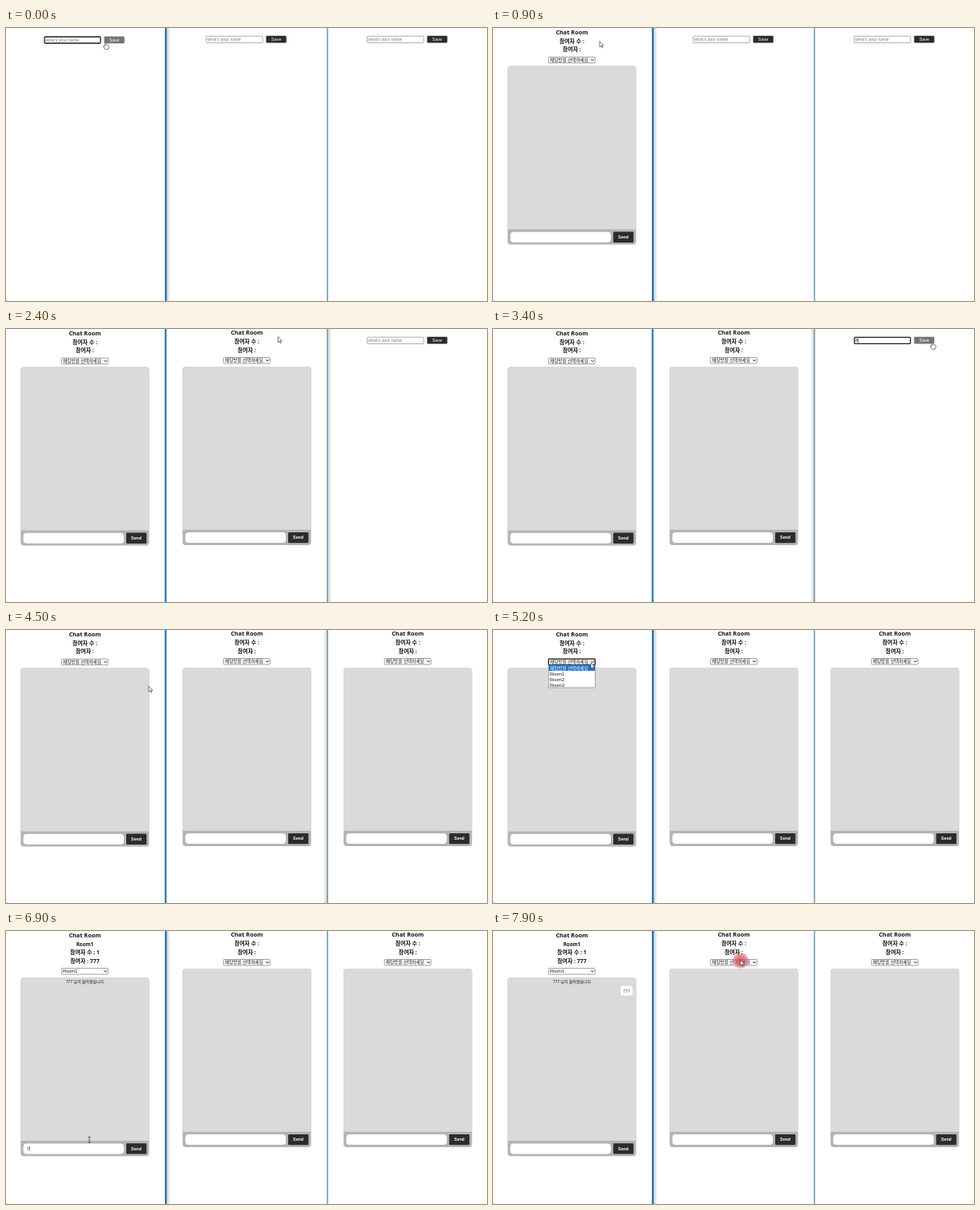
Animation, 600 px wide and 341 px high, one loop 8000 ms. Source, as an HTML page:

```html
<!DOCTYPE html>
<html lang="ko">
<head>
<meta charset="utf-8">
<title>Chat Room</title>
<style>
  html, body { margin: 0; width: 100%; height: 100%; overflow: hidden; background: #fff; }
  svg { display: block; width: 100%; height: 100%; }
  text { font-family: "Liberation Sans", "Noto Sans CJK KR", "Noto Sans CJK", sans-serif; white-space: pre; }
  .head { font-family: "Noto Sans", "Noto Sans CJK KR", "Noto Sans CJK", sans-serif; font-weight: 700; }
  .kr { font-family: "Noto Sans CJK KR", "Noto Sans CJK", sans-serif; }
</style>
</head>
<body>
<svg id="stage" viewBox="0 0 600 341">
  <defs>
    <radialGradient id="click">
      <stop offset="0" stop-color="#c9404c" stop-opacity=".8"/>
      <stop offset=".55" stop-color="#d95560" stop-opacity=".75"/>
      <stop offset="1" stop-color="#e88b92" stop-opacity=".6"/>
    </radialGradient>
    <linearGradient id="shade">
      <stop offset="0" stop-color="#567" stop-opacity=".28"/>
      <stop offset="1" stop-color="#567" stop-opacity="0"/>
    </linearGradient>
  </defs>
  <g id="scene"></g>
</svg>
<script>
const LOOP = 8000, STEP = 100;
const PROMPT = '채팅방을 선택하세요';
const INK = '#141414';
const scene = document.getElementById('scene');

const panels = [
  { x: 0, y: 0, name: '777', focus: 0, hover: [0, 900], typed: [400, 500, 600], enter: 900 },
  { x: 202, y: -.7, name: '555', focus: 1700, hover: [1900, 2400], typed: [1800, 2000, 2200], enter: 2400 },
  { x: 402.8, y: -.7, name: '888', focus: 3100, hover: [3300, 4000], typed: [3400, 3600, 3800], enter: 4000 }
];
const message = { typed: [6900, 7000, 7200], sent: 7400 };
const room = { open: 5000, hover: 5300, joined: 5600, blur: 6700 };
const clicks = [[4900, 5100], [5600, 5900], [6700, 6900], [7900, 8000]];

// time, x, y, shape
const path = [
  [0, 124, 17.5, 'hand'], [200, 126, 17.5, 'hand'], [400, 126, 17.2, 'hand'], [700, 133, 16.5, 'hand'],
  [900, 133, 16.5, 'arrow'], [1150, 150, 17, 'arrow'], [1400, 258, 16, 'beam'], [1700, 264.5, 16, 'beam'],
  [1900, 338, 12, 'hand'], [2400, 339.3, 9.5, 'arrow'], [2600, 348, 10, 'arrow'], [3000, 478, 15, 'beam'],
  [3200, 536, 15, 'hand'], [3400, 548, 16, 'hand'], [4000, 547, 16.5, 'arrow'], [4100, 530, 20, 'arrow'],
  [4500, 178, 70, 'arrow'], [4800, 124, 40, 'arrow'], [5200, 122, 41, 'arrow'], [5500, 110.8, 52.5, 'arrow'],
  [5900, 110.8, 53, 'arrow'], [6500, 104, 260, 'beam'], [7500, 104, 262, 'beam'], [7600, 112, 250, 'arrow'],
  [7800, 290, 62, 'arrow'], [7900, 308.5, 36, 'arrow'], [8000, 308.5, 36, 'arrow']
];

const between = (t, [a, b]) => t >= a && t < b;
const typedText = (text, times, t) => text.slice(0, times.filter(at => t >= at).length);

const rect = (x, y, w, h, fill, r = 0, stroke = 'none', sw = 0) =>
  `<rect x="${x}" y="${y}" width="${w}" height="${h}" rx="${r}" fill="${fill}" stroke="${stroke}" stroke-width="${sw}"/>`;

const label = (x, y, str, size, { fill = INK, anchor = 'start', cls = '', weight = '' } = {}) =>
  `<text x="${x}" y="${y}" font-size="${size}" fill="${fill}" text-anchor="${anchor}" class="${cls}"` +
  `${weight && ` font-weight="${weight}"`}>${str}</text>`;

const middle = (y, str, size, cls = 'head') => label(98.4, y, str, size, { anchor: 'middle', cls });

const caret = (x, y) => rect(x, y, .6, 5.6, '#333');

function nameForm(p, t) {
  const focused = t >= p.focus;
  const value = typedText(p.name, p.typed, t);
  const hovered = between(t, p.hover);
  return `<g transform="translate(${p.x} ${p.y})">` +
    (focused
      ? rect(48, 11, 69.9, 8, '#fff', 1, '#1c1c1c', 1.3)
      : rect(47.8, 10.9, 70.4, 8.2, '#fff', .8, '#8a8a8a', .7)) +
    (value ? label(49.4, 17, value, 5.35) : label(49.2, 17, 'what\'s your name', 5.35, { fill: '#777' })) +
    (focused && value ? caret(49.6 + value.length * 2.97, 12.2) : '') +
    rect(122.5, 10.5, 25.2, 8.8, hovered ? '#747474' : '#2b2b2b', 1) +
    label(135, 16.9, 'Save', 5.4, { fill: '#fff', anchor: 'middle' }) + '</g>';
}

function selectBox(y, value, focused) {
  return rect(69.3, y, 58, 7.5, '#fff', .8, focused ? INK : '#777', focused ? 1.3 : .7) +
    label(71, y + 5.75, value, 5.6, { cls: value === PROMPT ? 'kr' : '' }) +
    `<path d="M122.3 ${y + 2.8}l1.8 1.8 1.8-1.8" fill="none" stroke="#222" stroke-width="1"/>`;
}

function optionList(t) {
  const options = [PROMPT, 'Room1', 'Room2', 'Room3'];
  const active = t >= room.hover ? 1 : 0;
  return rect(69.3, 44, 58, 28, '#fff', 0, '#777', .6) + options.map((option, i) =>
    (i === active ? rect(69.5, 44.2 + i * 7, 57.6, 6.8, '#1e74d2') : '') +
    label(71, 49.6 + i * 7, option, 5.6, { fill: i === active ? '#fff' : INK, cls: i ? '' : 'kr' })
  ).join('');
}

function chatRoom(p, t) {
  const first = p === panels[0];
  const joined = first && t >= room.joined;
  const shift = joined ? 10.6 : 0;
  const draft = first && t < message.sent ? typedText(p.name, message.typed, t) : '';
  const writing = first && between(t, [room.blur, 7600]);
  const suffix = value => joined ? ' ' + value : '';
  return `<g transform="translate(${p.x} ${p.y})">` +
    middle(7.9, 'Chat Room', 7.3) +
    (joined ? middle(18.8, 'Room1', 6.2) : '') +
    middle(18.8 + shift, '참여자 수 :' + suffix(1), 6.9) +
    middle(29.4 + shift, '참여자 :' + suffix(p.name), 6.9) +
    selectBox(36.2 + shift - (joined ? .2 : 0), joined ? 'Room1' : PROMPT, first && between(t, [room.open, room.blur])) +
    `<g transform="translate(0 ${shift})">` +
    rect(18.3, 47.6, 160.2, 223, '#b5b3b6', 4) +
    `<path d="M18.3 251.5V51.6a4 4 0 0 1 4-4h152.2a4 4 0 0 1 4 4V251.5z" fill="#dbd9dc"/>` +
    rect(21.7, 254.8, 125.3, 13, '#fff', 4) +
    rect(150, 254.6, 25.3, 13.4, '#2c2c2c', 1.3) +
    label(162.6, 263.2, 'Send', 5.3, { fill: '#fff', anchor: 'middle', weight: 700 }) +
    (writing ? label(26, 263.2, draft, 5.35) + caret(26.2 + draft.length * 2.97, 258.4) : '') +
    '</g>' +
    (joined ? middle(64.8, p.name + ' 님이 들어왔습니다', 4.95, 'kr') : '') +
    (first && t >= message.sent
      ? rect(159.2, 68.6, 14.8, 11.9, '#fff', 2) + label(166.6, 76.6, p.name, 5.5, { fill: '#555', anchor: 'middle' })
      : '') +
    (first && between(t, [room.open + 100, room.joined]) ? optionList(t) : '') +
    '</g>';
}

function dividers(t) {
  const active = t < 1700 || t >= 4900 ? 0 : t < 3100 ? 1 : 2;
  const shadow = (x, dir) => `<rect width="5" height="341" fill="url(#shade)" transform="translate(${x} 0) scale(${dir} 1)"/>`;
  return (active === 0 ? shadow(200.5, 1) : shadow(198.5, -.5)) +
    rect(198.3, 0, active ? 1.9 : 2.2, 341, active ? '#0e76b4' : '#126799') +
    (active === 1 ? shadow(401.5, 1) : active === 2 ? shadow(400.5, -1) : '') +
    rect(400.3, 0, 1.3, 341, active ? '#5b7b90' : '#4d87a5');
}

const shapes = {
  arrow: '<path d="M0 0V7.2L1.7 5.7 2.8 8.2 3.9 7.7 2.8 5.3H5Z" fill="#fff" stroke="#333" stroke-width=".65"/>',
  hand: '<path d="M-.8 .8Q0-.4 .8 .8V3.6Q1.6 3 2.1 3.8 3 3.3 3.3 4.1 4.3 3.8 4.4 5V6.6L3.4 9.2H-.4L-2.5 6Q-2.8 4.8-1.7 5L-.8 5.8Z" fill="#fff" stroke="#333" stroke-width=".65"/>',
  beam: '<path d="M-1.4-3.4H1.4M0-3.4V3.4M-1.4 3.4H1.4" fill="none" stroke="#222" stroke-width=".7"/>'
};

function pointer(t) {
  const i = Math.max(0, path.findLastIndex(k => t >= k[0]));
  const a = path[i], b = path[Math.min(i + 1, path.length - 1)];
  const u = b[0] > a[0] ? (t - a[0]) / (b[0] - a[0]) : 0;
  const e = u * u * (3 - 2 * u);
  const x = a[1] + (b[1] - a[1]) * e, y = a[2] + (b[2] - a[2]) * e;
  const pressed = clicks.some(span => between(t, span));
  return `<g transform="translate(${x} ${y})">` +
    (pressed ? '<circle cx=".5" cy="1" r="9.8" fill="url(#click)"/>' : '') + shapes[a[3]] + '</g>';
}

function draw(t) {
  scene.innerHTML = rect(0, 0, 600, 341, '#fff') + dividers(t) +
    panels.map(p => t < p.enter ? nameForm(p, t) : chatRoom(p, t)).join('') +
    rect(0, 340, 2, 1, '#ddd') + pointer(t);
}

let shown = -1;
function tick() {
  const t = Math.floor((performance.now() % LOOP) / STEP) * STEP;
  if (t !== shown) draw(shown = t);
  requestAnimationFrame(tick);
}
tick();
</script>
</body>
</html>
```
